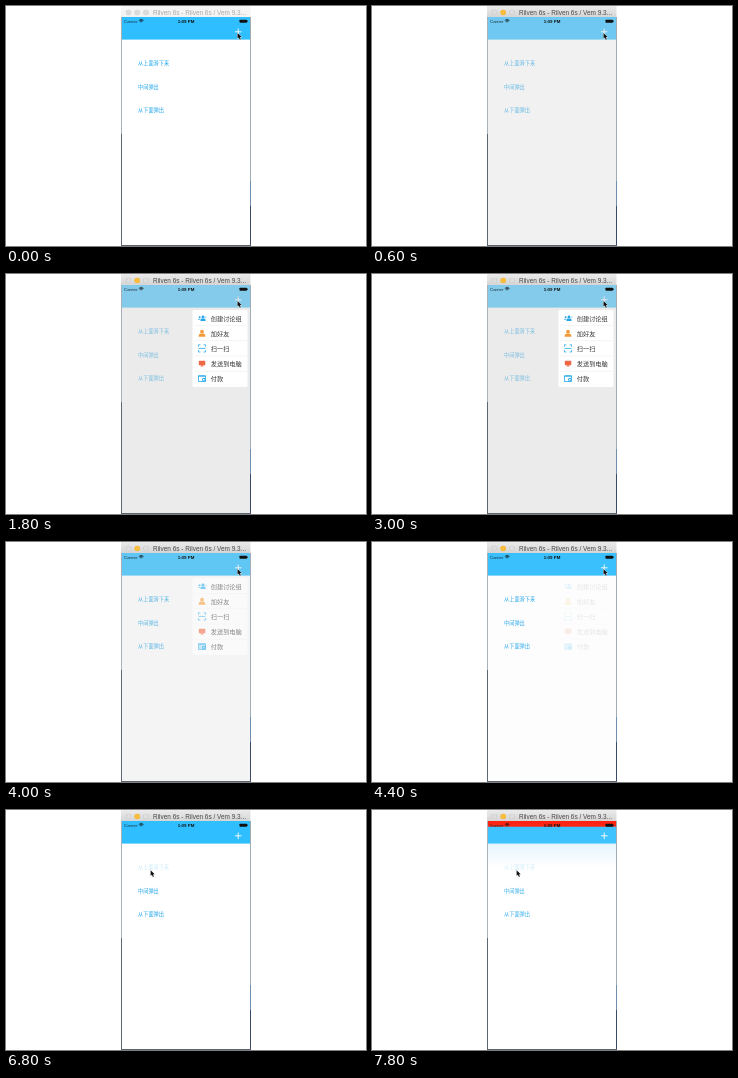
An HTML page with a canvas that plays this animation: 360 px wide and 240 px high, repeating every 8 s.

```html
<!DOCTYPE html>
<html lang="zh-CN">
<head>
<meta charset="utf-8">
<title>Popup menu demo</title>
<style>
html, body { margin: 0; width: 100%; height: 100%; overflow: hidden; background: #fff; }
canvas { display: block; width: 360px; height: 240px; }
</style>
</head>
<body>
<canvas id="stage"></canvas>
<script>
const canvas = document.getElementById('stage');
const ctx = canvas.getContext('2d');
const ratio = window.devicePixelRatio || 1;
canvas.width = 360 * ratio;
canvas.height = 240 * ratio;

const LOOP = 8000, STEP = 200;
const SANS = '"Liberation Sans", Arial, sans-serif';
const CJK = '"Noto Sans CJK SC", "Noto Sans CJK", sans-serif';
const BLUE = '#2fbeff', LINK = '#24a7ea', ORANGE = '#f59a36', RED = '#ee6845';

// Smooth progress from 0 to 1 between two times.
function ease(t, start, end) {
  const p = Math.min(1, Math.max(0, (t - start) / (end - start)));
  return p * p * (3 - 2 * p);
}
const mix = (a, b, p) => a + (b - a) * p;

function rect(x, y, w, h, color) {
  ctx.fillStyle = color;
  ctx.fillRect(x, y, w, h);
}

function verticalShade(y, h, from, to) {
  const shade = ctx.createLinearGradient(0, y, 0, y + h);
  shade.addColorStop(0, from);
  shade.addColorStop(1, to);
  rect(115, y, 129.5, h, shade);
}

function disc(x, y, r, color) {
  ctx.fillStyle = color;
  ctx.beginPath();
  ctx.arc(x, y, r, 0, Math.PI * 2);
  ctx.fill();
}

function rounded(x, y, w, h, r, color) {
  ctx.fillStyle = color;
  ctx.beginPath();
  ctx.roundRect(x, y, w, h, r);
  ctx.fill();
}

function path(points, color, width = 0.8) {
  ctx.strokeStyle = color;
  ctx.lineWidth = width;
  ctx.beginPath();
  points.forEach(([x, y], i) => i ? ctx.lineTo(x, y) : ctx.moveTo(x, y));
  ctx.stroke();
}

function label(text, x, y, font, color, align = 'left') {
  ctx.font = font;
  ctx.fillStyle = color;
  ctx.textAlign = align;
  ctx.textBaseline = 'alphabetic';
  ctx.fillText(text, x, y);
}

function withAlpha(alpha, draw) {
  if (alpha <= 0) return;
  ctx.save();
  ctx.globalAlpha *= alpha;
  draw();
  ctx.restore();
}

function titleBar(active) {
  verticalShade(0, 11, active ? '#ebebeb' : '#f7f7f7', active ? '#d5d5d5' : '#f2f2f2');
  [122.5, 131.2, 140].forEach((x, i) => {
    const lit = active && i === 1;
    disc(x, 6.5, 2.8, lit ? '#eab02e' : active ? '#c5c5c5' : '#d2d2d2');
    disc(x, 6.5, 2.4, lit ? '#fdbd3e' : active ? '#dedede' : '#dcdcdc');
  });
  label('Rilven 6s - Rilven 6s / Vem 9.3...', 147, 9, `6.45px ${SANS}`, active ? '#4a4a4a' : '#a8a8a8');
}

function statusBar() {
  label('Carrier', 118, 16.7, `4.4px ${SANS}`, '#1b2b34');
  ctx.strokeStyle = '#111';
  ctx.lineWidth = 0.7;
  [1.2, 2.3, 3.3].forEach(r => {
    ctx.beginPath();
    ctx.arc(135.2, 16.8, r, -Math.PI * 0.75, -Math.PI * 0.25);
    ctx.stroke();
  });
  label('1:09 PM', 180, 16.7, `bold 4.4px ${SANS}`, '#111', 'center');
  rounded(233.5, 13.7, 7.5, 3, 0.6, '#111');
  rect(241.2, 14.5, 0.7, 1.4, '#111');
}

function page(pressed) {
  rect(115, 11, 129.5, 229, '#fff');
  rect(115, 11, 129.5, 22.6, BLUE);
  path([[229, 25.8], [235.5, 25.8]], '#fff', 0.9);
  path([[232.2, 22.5], [232.2, 29.1]], '#fff', 0.9);
  const links = [['从上面滑下来', 59.2], ['中间弹出', 82.8], ['从下面弹出', 106.2]];
  links.forEach(([text, y], i) => withAlpha(pressed && i === 0 ? 0.22 : 1, () =>
    label(text, 132, y, `5.2px ${CJK}`, LINK)));
}

function person(x, y, size, color) {
  disc(x, y - 1.5 * size, 1.7 * size, color);
  rounded(x - 3 * size, y + 0.4 * size, 6 * size, 2.8 * size, [1.6 * size, 1.6 * size, 0.5, 0.5], color);
}

const icons = [
  y => {
    person(197, y, 0.85, LINK);
    disc(193.6, y - 0.9, 1, LINK);
    path([[192, y + 1.2], [194, y + 1.2]], LINK, 0.7);
    path([[199.2, y - 1], [200.6, y - 1]], LINK, 0.6);
  },
  y => person(196, y, 1.1, ORANGE),
  y => {
    for (const sx of [-1, 1]) for (const sy of [-1, 1]) {
      const x = 196 + sx * 3.6, edge = y + sy * 3.6;
      path([[x - sx * 2, edge], [x, edge], [x, edge - sy * 2]], LINK);
    }
    path([[192.5, y], [199.5, y]], LINK);
  },
  y => {
    rounded(192.8, y - 2.8, 6.5, 4.6, 0.7, RED);
    rect(195.3, y + 1.6, 1.5, 1, RED);
    rect(194.4, y + 2.3, 3.2, 0.6, RED);
  },
  y => {
    rounded(192, y - 3.4, 8, 6.8, 1, LINK);
    rect(192.8, y - 1.9, 6.4, 4.5, '#fff');
    disc(197.8, y + 1, 1.8, LINK);
    disc(197.8, y + 1, 0.9, '#fff');
  }
];

function menu() {
  rounded(186.5, 36, 55, 77, 1.5, '#fff');
  ['创建讨论组', '加好友', '扫一扫', '发送到电脑', '付款'].forEach((text, i) => {
    const y = 44.2 + i * 15.1;
    icons[i](y);
    label(text, 204.8, y + 2.3, `6.2px ${CJK}`, '#333');
    if (i < 4) rect(188, y + 7.4, 53, 0.4, '#e5e5e5');
  });
}

function desktopEdges() {
  rect(115, 11, 1, 117, '#a9b0b6');
  rect(115, 128, 1, 112, '#5d6874');
  rect(244, 11, 1, 164, '#a3adb6');
  rect(244, 175, 1, 25, '#6f8fb0');
  rect(244, 200, 1, 40, '#3d4a66');
  rect(115, 239, 130, 1, '#5a636e');
}

function cursor(x, y) {
  ctx.beginPath();
  [[0, 0], [0, 5.6], [1.3, 4.5], [2.3, 6.8], [3.3, 6.3], [2.3, 4.2], [4.1, 4.1]]
    .forEach(([dx, dy]) => ctx.lineTo(x + dx, y + dy));
  ctx.closePath();
  ctx.strokeStyle = '#fff';
  ctx.lineWidth = 0.8;
  ctx.stroke();
  ctx.fillStyle = '#111';
  ctx.fill();
}

function draw(t) {
  const closing = 1 - ease(t, 3480, 4650);
  const menuAlpha = ease(t, 680, 1700) * closing;
  const dim = ease(t, 200, 800) * closing;
  const sheet = ease(t, 6800, 7800);
  const move = ease(t, 4600, 5200);

  ctx.setTransform(ratio, 0, 0, ratio, 0, 0);
  rect(0, 0, 360, 240, '#fff');
  page(t >= 6400);
  withAlpha(dim * 0.5, () => rect(115, 11, 129.5, 229, '#d8d8d8'));
  withAlpha(menuAlpha, menu);
  withAlpha(sheet, () => {
    rect(115, 11, 129.5, 229, 'rgba(250, 250, 250, 0.08)');
    verticalShade(33.6, 24, 'rgba(47, 170, 235, 0.12)', 'rgba(47, 170, 235, 0)');
  });
  rect(115, 11, 129.5, 5.7 * sheet, '#ff2412');
  statusBar();
  desktopEdges();
  titleBar(t >= 200);
  cursor(mix(231.5, 144.6, move), mix(27, 60.2, move));
}

function tick() {
  const t = performance.now() % LOOP;
  draw(Math.floor(t / STEP) * STEP);
  requestAnimationFrame(tick);
}
tick();
</script>
</body>
</html>
```
